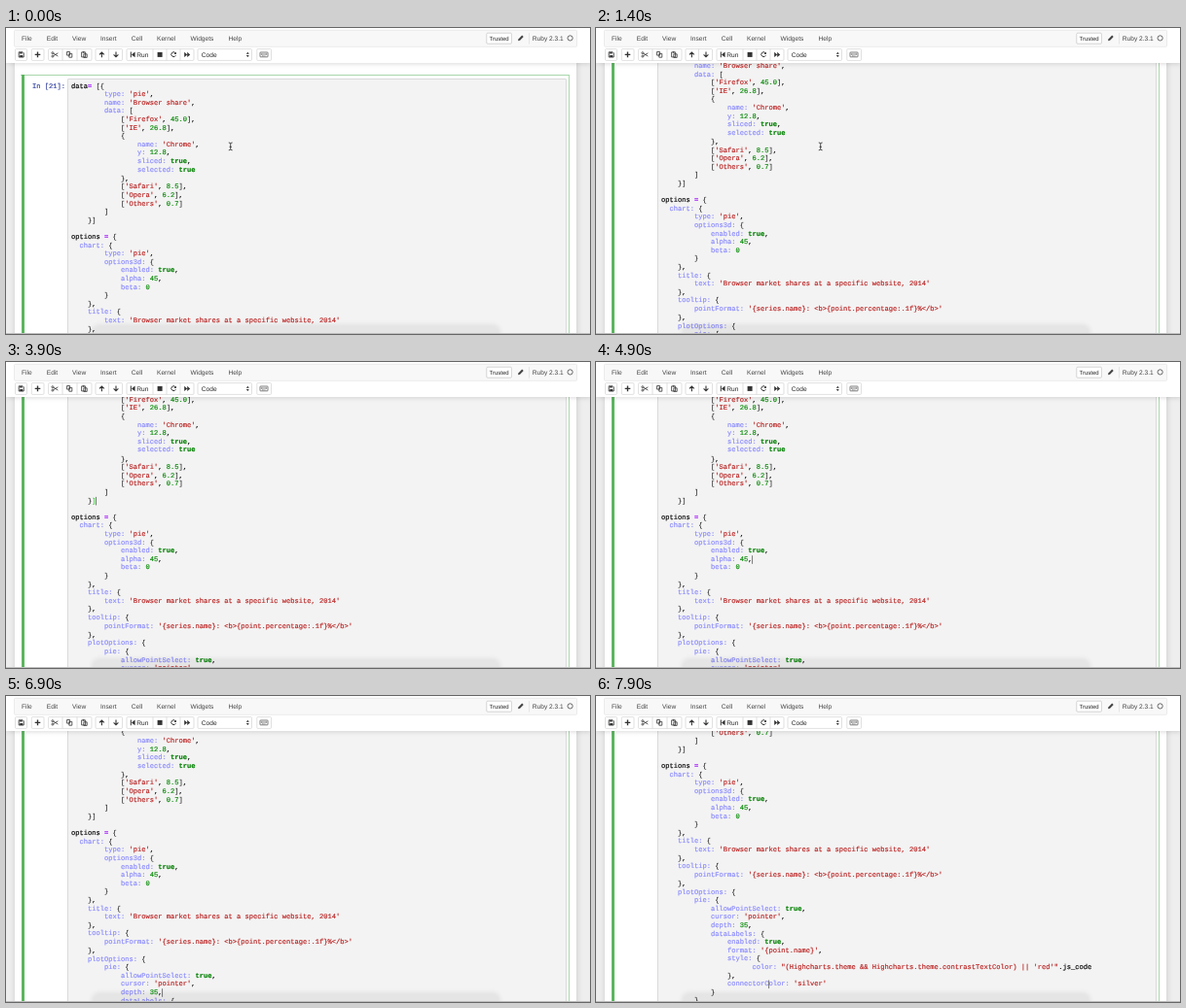
An HTML page for the animation above (8 s loop, 600 by 315 pixels).

```html
<!DOCTYPE html>
<html lang="en">
<head>
<meta charset="utf-8">
<title>Notebook</title>
<style>
html, body { margin: 0; width: 100%; height: 100%; overflow: hidden; background: #eee; }
#stage { position: relative; width: 600px; height: 315px; overflow: hidden; background: #eee; }
#stage > *, #cell > * { position: absolute; }
#page { left: 9px; top: 0; width: 577px; height: 330px; background: #fff; box-shadow: 0 0 6px .5px rgba(87,87,87,.2); }
#cell { left: 15px; top: 48px; width: 564px; height: 700px; box-sizing: border-box;
  border: 1px solid #a9d8ac; border-left: 0; }
#bar { left: 0.5px; top: -1px; width: 3px; height: 700px; background: #5cb560; }
#input { left: 48px; top: 3px; width: 511px; height: 690px; background: #f3f3f3; border: 1px solid #dadada; border-radius: 1px; }
.code { margin: 0; font: 14px/17.04px "Liberation Mono", "DejaVu Sans Mono", monospace; white-space: pre;
  transform: scale(.506); transform-origin: 0 0; text-rendering: geometricPrecision;
  -webkit-text-stroke: .35px currentColor; color: #000; }
#prompt { left: 11.8px; top: 6.7px; color: #303f9f; }
#code { left: 52px; top: 6.7px; }
.key { color: #88f; }
.str { color: #ba2121; }
.num { color: #080; }
.kw { color: #008000; font-weight: bold; }
.op { color: #a2f; font-weight: bold; }
.br { -webkit-text-stroke: 0; }
.match { color: #0b0; }
#caret { position: absolute; left: 0; top: 0; width: 1.4px; height: 17px; background: #000; }
#dock { left: 90px; top: 307px; width: 416px; height: 30px; border-radius: 6px;
  background: rgba(0,0,0,.06); box-shadow: 0 0 5px 2px rgba(0,0,0,.07); }
#edge { left: 0; top: 314px; width: 600px; height: 1px; background: #bdbdbd; }
#head { left: 0; top: 0; width: 600px; height: 36px; background: #fff; box-shadow: 0 0 5px .5px rgba(87,87,87,.25); }
#head text { font-family: "Liberation Sans", Arial, sans-serif; font-size: 6.6px; fill: #444; text-rendering: geometricPrecision; }
#head .dark text, #head text.dark { fill: #222; }
#beam { left: 227px; top: 116.5px; }
</style>
</head>
<body>
<div id="stage">
  <div id="page"></div>
  <div id="cell">
    <div id="bar"></div>
    <div id="input"></div>
    <div id="prompt" class="code">In [21]:</div>
    <pre id="code" class="code"></pre>
  </div>
  <div id="dock"></div>
  <div id="edge"></div>
  <svg id="head" viewBox="0 0 600 36">
    <rect x="8.5" y="2.3" width="578" height="17" rx="1" fill="#f8f8f8" stroke="#e4e4e4" stroke-width=".7"/>
    <g id="menu"></g>
    <rect x="493.8" y="5.2" width="25.6" height="11" rx="1" fill="#fff" stroke="#bbb" stroke-width=".6"/>
    <text x="506.6" y="12.9" text-anchor="middle" class="dark" style="font-size:6px">Trusted</text>
    <path d="M526 13.2l.6-2 3.6-3.6 1.5 1.5-3.6 3.6z" fill="#444"/>
    <path d="M537.5 5v11.5" stroke="#ddd" stroke-width=".7"/>
    <text x="540.8" y="12.9">Ruby 2.3.1</text>
    <circle cx="579.6" cy="10.4" r="2.6" fill="none" stroke="#444" stroke-width=".8"/>
    <g id="buttons" fill="#fff" stroke="#ccc" stroke-width=".6"></g>
    <g fill="#333" class="dark">
      <path d="M13.2 24.8h4l1 1v4.2h-5z" fill="none" stroke="#333" stroke-width=".9"/>
      <path d="M14.2 25h2.4v1.6h-2.4zM14.2 28h3v2h-3z"/>
      <path d="M31.8 24.6h1.4v2.1h2.1v1.4h-2.1v2.1h-1.4v-2.1h-2.1v-1.4h2.1z"/>
      <g fill="none" stroke="#333" stroke-width=".8">
        <circle cx="47.9" cy="25.7" r="1"/><circle cx="47.9" cy="29.1" r="1"/>
        <path d="M48.8 26.2l4.6 2.8M48.8 28.6l4.6-2.8"/>
        <path d="M62.6 24.5h3v3.6h-3zM64.8 26.4h3v3.8h-3z" fill="#fff"/>
        <path d="M77.6 24.9h4v5h-4zM79.8 26.8h3.4v3.6h-3.4z" fill="#fff"/>
        <path d="M98.4 30.3v-5M96 27.4l2.4-2.4 2.4 2.4M113 24.5v5M110.6 27.4l2.4 2.4 2.4-2.4" stroke-width="1.1"/>
        <path d="M173.9 25.5a2.4 2.4 0 1 0 .5 2.7" stroke-width="1"/>
      </g>
      <path d="M78.8 24.3h1.7v1.2h-1.7zM172.6 26.9h2.3v-2.3z"/>
      <path d="M127.8 24.6h1v5.6h-1zM129 27.4l3.6-2.8v5.6z"/>
      <text x="134.3" y="29.7">Run</text>
      <path d="M155.6 24.9h5v5h-5z"/>
      <path d="M183.2 24.7l3 2.7-3 2.7zM186.2 24.7l3 2.7-3 2.7z"/>
      <text x="200.8" y="29.7">Code</text>
      <path d="M246.8 26.7l1.5-2 1.5 2zM246.8 28.1l1.5 2 1.5-2z"/>
      <rect x="261" y="25" width="8" height="4.8" rx=".5" fill="none" stroke="#444" stroke-width=".7"/>
      <path d="M262.2 26.5h5.8M262.2 27.5h5.8M263.2 28.7h3.6" stroke="#444" stroke-width=".6" stroke-dasharray=".8 .4"/>
    </g>
  </svg>
  <svg id="beam" width="8" height="10" fill="none" stroke="#222" stroke-width=".8">
    <path d="M1.8 1q1.9 0 1.9 1.2v5.4q0 1.2-1.9 1.2M5.6 1q-1.9 0-1.9 1.2M3.7 7.6q0 1.2 1.9 1.2M2.6 5.4h2.2"/>
  </svg>
</div>
<script>
const source = `data= [{
        type: 'pie',
        name: 'Browser share',
        data: [
            ['Firefox', 45.0],
            ['IE', 26.8],
            {
                name: 'Chrome',
                y: 12.8,
                sliced: true,
                selected: true
            },
            ['Safari', 8.5],
            ['Opera', 6.2],
            ['Others', 0.7]
        ]
    }]

options = {
  chart: {
        type: 'pie',
        options3d: {
            enabled: true,
            alpha: 45,
            beta: 0
        }
    },
    title: {
        text: 'Browser market shares at a specific website, 2014'
    },
    tooltip: {
        pointFormat: '{series.name}: <b>{point.percentage:.1f}%</b>'
    },
    plotOptions: {
        pie: {
            allowPointSelect: true,
            cursor: 'pointer',
            depth: 35,
            dataLabels: {
                enabled: true,
                format: '{point.name}',
                style: {
                      color: "(Highcharts.theme && Highcharts.theme.contrastTextColor) || 'red'".js_code
                },
                connectorColor: 'silver'
            }
        }
    }
}`;
const $ = id => document.getElementById(id);
const svg = (parent, tag, attrs, text = '') => {
  const el = document.createElementNS('http://www.w3.org/2000/svg', tag);
  for (const k in attrs) el.setAttribute(k, attrs[k]);
  el.textContent = text;
  parent.append(el);
};

const menu = { File: 16, Edit: 41.8, View: 68, Insert: 97, Cell: 128.8, Kernel: 155, Widgets: 189.5, Help: 228.5 };
for (const name in menu) svg($('menu'), 'text', { x: menu[name], y: 12.9 }, name);

// button groups: left, right, inner dividers
[[9.5, 21.5], [26.3, 39], [43.6, 88, 58, 73], [92, 119.5, 105.5], [124, 193, 151, 165, 179], [197, 252.5], [257.8, 272.5]]
  .forEach(([x, end, ...cuts]) => {
    svg($('buttons'), 'rect', { x, y: 21.6, width: end - x, height: 11.8, rx: 1 });
    cuts.forEach(c => svg($('buttons'), 'path', { d: `M${c} 21.6v11.8` }));
  });

// colour the code and pair its brackets
const lines = source.split('\n');
const kinds = ['str', 'key', 'kw', 'num', 'op', 'br'];
const token = /("[^"]*"|'[^']*')|(\w+:)|\b(true)\b|(\b\d[\d.]*)|(=)|([[\]{}])|\w+|\s+|./g;
const pairs = {};
const open = [];
lines.forEach((line, row) => {
  for (const m of line.matchAll(token)) {
    const kind = kinds[m.slice(1).findIndex(Boolean)];
    const span = document.createElement('span');
    span.textContent = m[0];
    if (kind) span.className = kind;
    $('code').append(span);
    if (kind !== 'br') continue;
    const here = { span, at: row + ':' + m.index };
    if ('[{'.includes(m[0])) open.push(here);
    else {
      const mate = open.pop();
      pairs[here.at] = pairs[mate.at] = [mate.span, span];
    }
  }
  $('code').append('\n');
});
const caret = document.createElement('div');
caret.id = 'caret';
$('code').append(caret);

const along = (points, x) => {
  let [px, py] = points[0];
  for (const [nx, ny] of points) {
    if (x <= nx) return nx === px ? ny : py + (ny - py) * (x - px) / (nx - px);
    [px, py] = [nx, ny];
  }
  return py;
};
const wheel = [[0, 0], [800, 20], [1400, 37.7], [2100, 55.1]];
const keys = [[2700, 7], [3900, 16], [5900, 29], [6900, 37], [7900, 44]];
const follow = [[35, 0], [37, 18.7], [44, 87.8]];
const goal = 26, advance = 8.402, pitch = 17.04;
let lit = [];

function draw(time) {
  const t = Math.floor(time % 8000 / 100) * 100;
  const row = Math.round(along(keys, t));
  const col = Math.min(goal, lines[row].length);
  const scroll = along(wheel, t) + along(follow, row);
  $('cell').style.transform = `translateY(${-scroll}px)`;
  caret.style.transform = `translate(${col * advance}px, ${row * pitch}px)`;
  caret.style.visibility = t >= 2700 || t % 1060 >= 530 ? 'visible' : 'hidden';
  $('beam').style.visibility = t < 2700 ? 'visible' : 'hidden';
  lit.forEach(s => s.classList.remove('match'));
  lit = pairs[row + ':' + (col - 1)] || pairs[row + ':' + col] || [];
  lit.forEach(s => s.classList.add('match'));
}
const start = performance.now();
function tick() {
  draw(performance.now() - start);
  requestAnimationFrame(tick);
}
tick();
</script>
</body>
</html>
```
